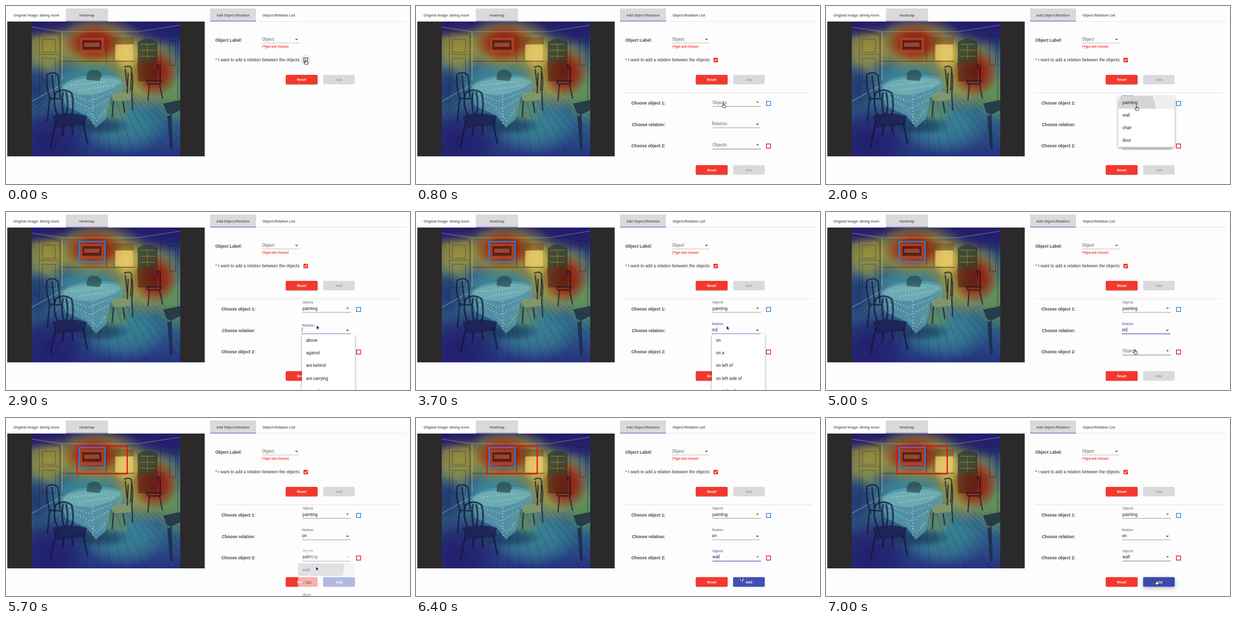
An HTML page with a canvas for the animation above (7100 ms loop, 800 px wide and 354 px high).

```html
<!DOCTYPE html>
<html lang="en">
<head>
<meta charset="utf-8">
<title>Object relation form</title>
<style>
  html, body { margin: 0; width: 100%; height: 100%; overflow: hidden; background: #fefdfe; }
  canvas { display: block; }
</style>
</head>
<body>
<canvas id="stage" width="800" height="354"></canvas>
<script>
const LOOP = 7100, STEP = 100;
const BLUE = '#3f51b5', RED = '#f4382d', INK = '#222', GREY = '#666';
const ROBOTO = 'Roboto, sans-serif', ARIAL = '"Liberation Sans", Arial, sans-serif';
const BODY = 8.37, SMALL = 6.28, TAB = 7.32;

// Moments of the interaction, in ms
const CHECK = 200, OPEN1 = 1250, PRESS1 = 1880, CLOSE1 = 2050, RELATION = 2700,
  TYPE_O = 3500, TYPE_N = 3700, PICK = 4600, OPEN2 = 5150, PRESS2 = 5520, CLOSE2 = 5660, ADD = 6900;

// time, x, y of the pointer tip
const TRACK = [
  [0, 593.5, 107], [250, 593.5, 107], [800, 609, 193.5], [1400, 609, 193.5], [1800, 615, 199],
  [2150, 615, 199], [2650, 615, 225], [3900, 615, 226], [4300, 609.5, 250.5], [4700, 609.5, 250.5],
  [5050, 612, 275], [5250, 612, 275], [5450, 613.5, 295], [5850, 613.5, 295], [6700, 654.5, 322.5]
];
const HAND_SPANS = [[0, 300], [700, 2200], [4100, 4700], [4950, 5650], [6500, LOOP]];
const HAND = new Path2D('M-.9 .3Q-.2-.4 .6 .3V3.3Q3.2 3.1 4.5 4.3V6.3L3.6 9H-.9L-3.6 5.7Q-3.1 4.4-.9 5.8Z');
const ARROW = new Path2D('M0 0V8.6L2 6.8L3.3 9.8L4.8 9.2L3.5 6.2H6.2Z');

const OBJECTS = ['painting', 'wall', 'chair', 'door'];
const RELATIONS = {
  '': ['above', 'against', 'are behind', 'are carrying', 'are eating'],
  o: ['of', 'on', 'on a', 'on left of', 'on left side of'],
  on: ['on', 'on a', 'on left of', 'on left side of', 'on right of']
};

const clamp = v => Math.max(0, Math.min(1, v));
const mix = (a, b, p) => a + (b - a) * p;
const ease = p => p * p * (3 - 2 * p);

let c;

function box(x, y, w, h, fill, r = 0) {
  c.fillStyle = fill;
  c.beginPath();
  c.roundRect(x, y, w, h, r);
  c.fill();
}

function frame(x, y, w, h, color, width) {
  c.strokeStyle = color;
  c.lineWidth = width;
  c.strokeRect(x, y, w, h);
}

function path(d, color, width) {
  const p = new Path2D(d);
  c.lineWidth = width;
  c[width ? 'strokeStyle' : 'fillStyle'] = color;
  width ? c.stroke(p) : c.fill(p);
}

// y is the middle of the capitals
function text(s, x, y, color, size = BODY, { family = ROBOTO, weight = 400, align = 'left' } = {}) {
  c.font = `${weight} ${size}px ${family}`;
  c.textAlign = align;
  c.fillStyle = color;
  c.fillText(s, x, y + size * .36);
}

function shadow(blur, dy, alpha) {
  c.shadowColor = `rgba(0,0,0,${alpha})`;
  c.shadowBlur = blur;
  c.shadowOffsetY = dy;
}

function glow(x, y, rx, ry, rgb, alpha) {
  c.save();
  c.translate(x, y);
  c.scale(rx, ry);
  const g = c.createRadialGradient(0, 0, 0, 0, 0, 1);
  g.addColorStop(0, `rgba(${rgb},${alpha})`);
  g.addColorStop(.5, `rgba(${rgb},${alpha * .75})`);
  g.addColorStop(1, `rgba(${rgb},0)`);
  c.fillStyle = g;
  c.fillRect(-1, -1, 2, 2);
  c.restore();
}

function paintRoom() {
  box(2.5, 31, 391, 268, '#2b292a');
  c.save();
  c.beginPath();
  c.rect(51, 31, 294, 268);
  c.clip();
  const base = c.createLinearGradient(0, 31, 0, 299);
  [[0, '#231c66'], [.25, '#335a80'], [.5, '#3a7391'], [.75, '#2d6088'], [1, '#263280']]
    .forEach(([p, color]) => base.addColorStop(p, color));
  c.fillStyle = base;
  c.fillRect(51, 31, 294, 268);

  const yellow = '178,160,44', red = '146,20,14', teal = '62,150,155', indigo = '34,27,108';
  glow(80, 85, 52, 58, yellow, .8);
  glow(180, 78, 102, 60, yellow, .95);
  glow(275, 130, 82, 82, yellow, .9);
  glow(335, 180, 42, 55, '104,150,76', .8);
  glow(175, 74, 60, 40, red, 1);
  glow(295, 132, 46, 50, red, 1);
  glow(238, 94, 28, 38, '225,190,90', .85);
  glow(165, 145, 70, 35, teal, .7);
  glow(235, 240, 85, 58, teal, .65);
  glow(215, 205, 40, 32, '130,150,64', .5);
  glow(85, 265, 90, 75, indigo, .9);
  glow(60, 165, 42, 50, '28,44,104', .8);
  glow(322, 42, 75, 38, indigo, .85);
  glow(60, 35, 72, 30, indigo, .95);

  // doors, floor boards and moulding
  const dark = 'rgba(22,20,50,.7)', faint = 'rgba(16,20,50,.3)', pale = 'rgba(220,225,180,.32)';
  path('M51 45L106 57V158M108 57V160M66 56V184M66 96H104M72 66H98V92H72ZM72 104H98V150H72Z', faint, 1.5);
  path('M111 52V148M51 190L113 155', pale, 2);
  path('M51 42L112 51H262L345 38', pale, 1.5);
  path('M306 62V150M318 58H340V190M324 68H336V118H324Z', faint, 2);
  c.save();
  c.beginPath();
  c.rect(51, 186, 294, 113);
  c.clip();
  for (let x = -130; x < 560; x += 24) path(`M190 100L${x} 299`, faint, 1);
  c.restore();
  glow(185, 238, 65, 20, '16,32,70', .55);

  // picture, window and cabinet
  box(147, 63, 47, 31, 'rgba(178,72,40,.7)');
  box(151, 68, 38, 19, '#5c1f1a');
  box(155, 73, 30, 8, '#96482f');
  box(209, 62, 44, 14, 'rgba(110,72,32,.55)');
  box(217, 77, 34, 31, 'rgba(236,207,112,.65)');
  path('M199 58V112M213 76V108M111 110H255', 'rgba(95,45,25,.5)', 1.8);
  path('M261 72Q280 58 300 72V112H261Z', 'rgba(44,58,42,.72)');
  path('M260 112H301V150H262Z', 'rgba(72,38,22,.6)');
  path('M266 76H295M266 88H295M266 100H295M280 76V107', 'rgba(160,170,100,.5)', 1.3);

  // chairs behind, table, chairs in front
  path('M234 122Q247 116 249 126L247 168M236 125L240 160M279 149H307L305 155H281ZM305 152V120Q296 112 302 126M284 155L281 188M304 155L310 184', dark, 2.5);
  path('M108 166Q112 144 165 138Q224 134 232 150L230 171L207 181L198 224L178 242L160 218L118 199Z', 'rgba(92,158,176,.72)');
  path('M112 161Q122 147 168 143Q215 140 228 151Q213 168 169 177Q125 178 112 161Z', 'rgba(140,198,190,.45)');
  c.setLineDash([2, 4]);
  path('M119 172L163 190L211 171M126 184L167 205L205 184M158 206L180 228L196 208M128 158L200 150M145 168L214 157M172 178V235', 'rgba(215,238,225,.5)', 2.5);
  c.setLineDash([]);
  path('M160 147Q158 128 171 127Q187 125 190 139L185 149Z', 'rgba(40,72,76,.7)');
  path('M208 177Q228 167 248 174L247 187L213 190Z', 'rgba(135,155,105,.85)');
  path('M249 132Q253 148 249 174L251 208M213 188L210 222M232 190L235 213M242 133L240 174', dark, 2.5);
  path('M80 137Q94 128 103 138L107 182M81 138Q78 162 89 188M91 137L96 180M83 183L110 185M86 186L82 230', dark, 3);
  path('M97 174Q113 161 130 173Q136 199 129 220M98 174Q91 196 105 224M113 171Q108 198 116 220M119 171Q125 196 119 220', dark, 3.5);
  path('M92 218Q126 209 160 219L157 236L101 242Z', 'rgba(28,30,80,.8)');
  path('M99 228L88 282M114 238L112 259M153 232L161 273M130 235L133 256', dark, 3.5);
  path('M311 194L345 187V207L321 219ZM319 213L325 285L330 285L328 216Z', 'rgba(26,36,64,.75)');
  c.restore();
}

function tab(s, x, y, w) {
  if (w) {
    box(x, 5, w, 25, '#dbd9dc');
    box(x, 29.5, w, 1, BLUE);
  }
  text(s, w ? x + w / 2 : x, y, '#5c5c5e', TAB, { weight: 500, align: w ? 'center' : 'left' });
}

function button(s, x, y, w, fill, color, lift) {
  c.save();
  if (lift) shadow(lift, lift / 3, .3);
  box(x, y, w, 18.8, fill, 2);
  c.restore();
  text(s, x + w / 2, y + 9.3, color, TAB, { weight: 500, align: 'center' });
}

const chevron = (x, y) => path(`M${x - 2} ${y - 1}L${x} ${y + 1}L${x + 2} ${y - 1}`, '#333', 1.3);

// Select or input with a label that floats up when focused
function field(label, value, x, y, focused, openAt, now, typed) {
  const p = ease(clamp((now - openAt) / 300));
  text(label, x, mix(y, y - 11.5, p), focused ? BLUE : GREY, mix(BODY, SMALL, p));
  if (value) text(value, x, y, INK);
  box(x, y + 7.8, 96, focused ? 1.2 : .8, focused ? BLUE : '#777');
  if (typed) chevron(676, y + 1);
  else path(`M673.6 ${y - 1.3}h5.4l-2.7 2.7Z`, focused ? '#5b66a8' : '#555');
}

function menu(x, y, w, items, textX, alpha, active, chosen, ripple) {
  if (alpha <= 0) return;
  const row = 25.15;
  c.save();
  c.globalAlpha = alpha;
  c.save();
  // a shadow would show through a translucent panel
  if (alpha === 1) shadow(5, 2, .4);
  box(x, y, w, items.length * row + .6, '#fff', 2);
  c.restore();
  if (active >= 0) box(x, y + active * row, w, row, '#f0eff0');
  if (ripple && ripple.r > 0) {
    c.save();
    c.beginPath();
    c.rect(x, y + active * row, w, row);
    c.clip();
    c.beginPath();
    c.arc(ripple.x, ripple.y, ripple.r, 0, 7);
    c.fillStyle = '#d6d5d6';
    c.fill();
    c.restore();
  }
  items.forEach((s, i) => text(s, textX, y + (i + .5) * row, i === chosen ? BLUE : INK));
  c.restore();
}

const fade = (now, open, close) => Math.min(clamp((now - open) / 100), clamp(1 - (now - close) / 100));
const ripple = (now, start, x, y) => ({ x, y, r: 70 * clamp((now - start) / 225) });

function relationPanel(t) {
  const bold = { family: ARIAL, weight: 700 };
  box(414, 172.2, 370, .8, '#d6d5d7');
  text('Choose object 1:', 426.5, 193.3, '#444', BODY, bold);
  text('Choose relation:', 427.5, 235.7, '#444', BODY, bold);
  text('Choose object 2:', 426.5, 278.3, '#444', BODY, bold);
  frame(694, 189.7, 8.2, 8.2, '#3485dc', 1.5);
  frame(694, 274.4, 8.2, 8.2, '#dc1f24', 1.5);

  const typed = t >= TYPE_N ? 'on' : t >= TYPE_O ? 'o' : '';
  const inRelation = t >= RELATION && t < OPEN2;
  field('Objects', t >= CLOSE1 && 'painting', 587, 191.5, t >= OPEN1 && t < RELATION, OPEN1, t);
  field('Relation', typed, 586, 234, inRelation, RELATION, t, true);
  field('Objects', t >= CLOSE2 && 'wall', 587, 276.3, t >= OPEN2 && t < ADD, OPEN2, t);
  if (inRelation && (t - RELATION) % 1000 < 500)
    box(586.3 + typed.length * 4.7, 229.5, .7, 9.5, INK);

  button('Reset', 554, 316.6, 63, RED, '#fff', 2);
  if (t < CLOSE2) button('Add', 628, 316.6, 62.5, '#dbd9dc', '#a09fa1');
  else button('Add', 628, 316.6, 62.5, t >= ADD ? '#3a4aaa' : BLUE, '#fff', t >= ADD ? 8 : 2);

  menu(578.5, 179, 112, OBJECTS, 587, fade(t, OPEN1, CLOSE1), 0, -1, ripple(t, PRESS1, 615, 200));
  if (t >= RELATION && t < PICK)
    menu(586, 242.5, 105, RELATIONS[typed], 594.3, 1, t >= 4200 ? 0 : -1);
  menu(578.5, 263.8, 112, OBJECTS, 587, fade(t, OPEN2, CLOSE2), t < 5400 ? 0 : 1,
    t >= CLOSE2 ? 1 : -1, ripple(t, PRESS2, 613, 297));
}

function pointer(t) {
  const i = TRACK.findLastIndex(k => k[0] <= t);
  const a = TRACK[i], b = TRACK[i + 1] || a;
  const p = a === b ? 0 : ease((t - a[0]) / (b[0] - a[0]));
  const hand = HAND_SPANS.some(([from, to]) => t >= from && t < to);
  c.save();
  c.translate(mix(a[1], b[1], p), mix(a[2], b[2], p));
  c.lineWidth = .9;
  c.strokeStyle = hand ? '#111' : '#fff';
  c.fillStyle = hand ? '#fff' : '#111';
  c.fill(hand ? HAND : ARROW);
  c.stroke(hand ? HAND : ARROW);
  c.restore();
}

function draw(t) {
  box(0, 0, 800, 354, '#fefdfe');
  c.drawImage(room, 0, 0);
  if (t >= CLOSE2) frame(140.5, 56, 99.5, 55, '#e01515', 2.4);
  if (t >= CLOSE1) frame(145, 59, 51, 40, '#1f86ec', 2.4);

  box(3, 30, 391, .7, '#dedde0');
  box(404, 30, 391, .7, '#dedde0');
  tab('Original Image: dining room', 15, 18);
  tab('Heatmap', 118.5, 18, 83.5);
  tab('Add Object/Relation', 404, 18, 91);
  tab('Object/Relation List', 508, 18);

  text('Object Label:', 414.5, 67.5, '#444', BODY, { family: ARIAL, weight: 700 });
  text('Object', 507, 65.5, GREY);
  chevron(575.3, 66.2);
  box(507, 73.2, 74, .8, '#aaa');
  text('(*type and choose)', 507, 80.5, '#f00', SMALL);
  text('* I want to add a relation between the objects', 414.5, 106.7, '#333', BODY, { family: ARIAL });

  if (t < 400) {
    c.beginPath();
    c.arc(593.5, 107.2, 10.3, 0, 7);
    c.fillStyle = 'rgba(0,0,0,.07)';
    c.fill();
  }
  if (t < CHECK) frame(589.6, 103.4, 7.8, 7.8, '#444', 1.2);
  else {
    box(589, 102.9, 9, 9, RED, 1);
    path('M590.8 107.4L592.8 109.3L596.4 105.4', '#fff', 1.2);
  }
  button('Reset', 554, 137, 63, RED, '#fff', 2);
  button('Add', 628, 137, 62.5, '#dbd9dc', '#a09fa1');

  if (t >= CHECK) relationPanel(t);
  pointer(t);
}

const stage = document.getElementById('stage');
const room = document.createElement('canvas');
room.width = 800;
room.height = 354;
c = room.getContext('2d');
paintRoom();
c = stage.getContext('2d');

function tick() {
  draw(Math.floor(performance.now() % LOOP / STEP) * STEP);
  requestAnimationFrame(tick);
}
tick();
</script>
</body>
</html>
```
